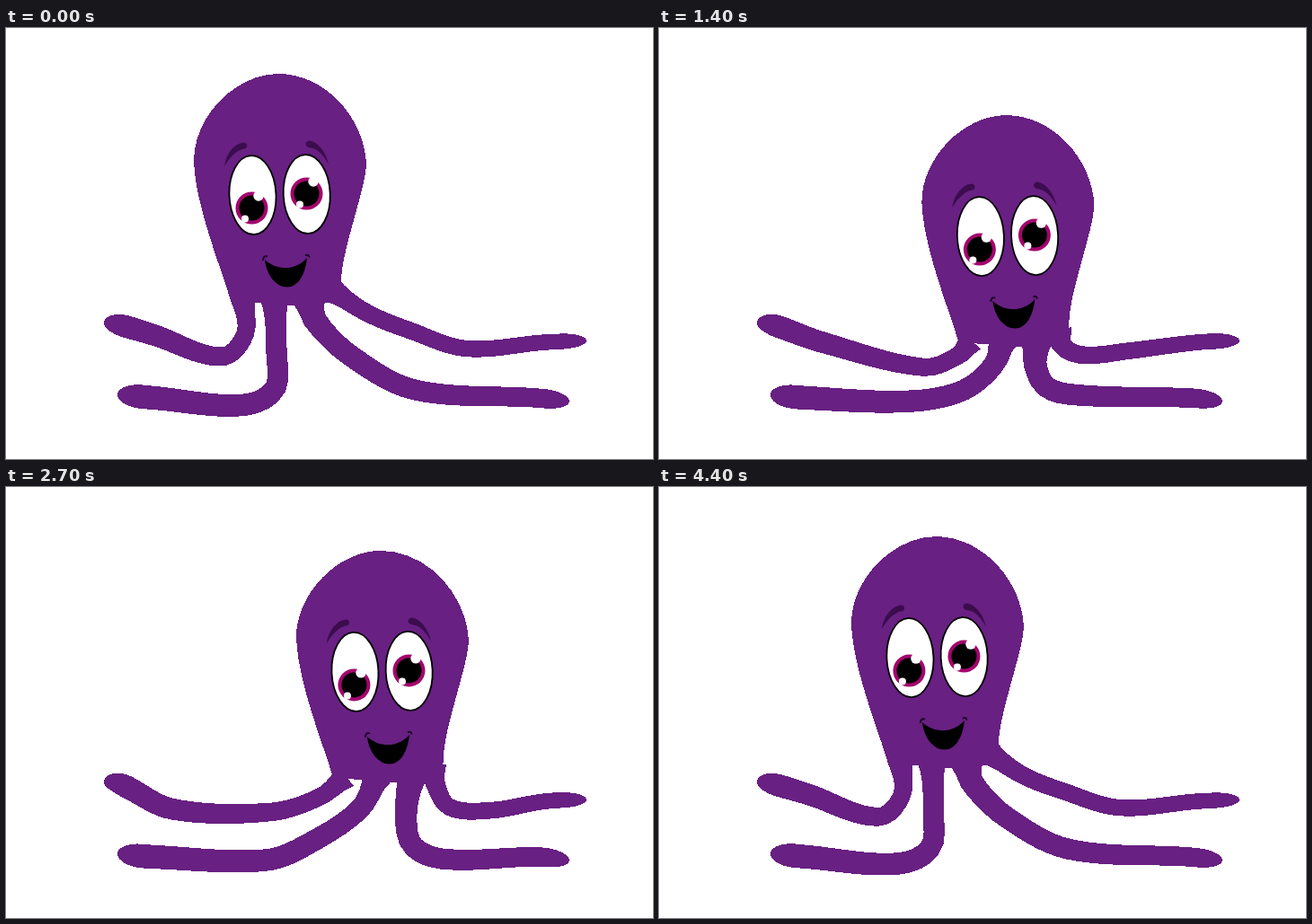
These frames come from a looping animation (720x480 px, 4500 ms). An HTML page:

```html
<!DOCTYPE html>
<html lang="en">
<head>
<meta charset="utf-8">
<title>Octopus</title>
<style>
  html, body { margin: 0; width: 100%; height: 100%; overflow: hidden; background: #fff; }
  svg { display: block; }
  .skin { fill: #682082; shape-rendering: crispEdges; }
</style>
</head>
<body>
<svg id="stage" width="720" height="480" viewBox="0 0 720 480">
  <defs>
    <g id="iris">
      <circle r="18" fill="#a3056c"/>
      <circle r="14"/>
      <circle cx="7.5" cy="-13.5" r="5.7" fill="#fff"/>
      <circle cx="-7.5" cy="12" r="4" fill="#fff"/>
    </g>
    <ellipse id="eye" rx="26" ry="44" transform="rotate(-2.5)" fill="#fff" stroke="#000" stroke-width="1.8"/>
  </defs>
  <g id="head">
    <path class="skin" d="M250 304C240 268 211 200 209 148C209 98 256 51 303 51C355 51 399 100 401 152
      C400 180 372 252 373 284Q372 302 353 307L316 309L279 306Z"/>
    <g fill="#3b0d4d">
      <path d="M243 154C245 139 255 128 265 127.5Q270 129 267 134C258 135 250 142 243 154Z"/>
      <path d="M359 152C356 137 346 126 337 125.5C332 127 333 132 337 133C347 134 353 141 359 152Z"/>
    </g>
    <use href="#eye" x="274.5" y="186"/>
    <use href="#eye" x="334.7" y="185"/>
    <use href="#iris" x="273.5" y="200.5"/>
    <use href="#iris" x="334.5" y="184.5"/>
    <path d="M288 258C302 271 323 270 335 256C333 275 325 288.500 313 288.500C300 288.500 290 275 288 258Z"/>
    <path d="M286 259q0-6 5-4.500M333 253.500q4-2 4.500 2" fill="none" stroke="#1c0526" stroke-width="2"/>
  </g>
</svg>
<script>
// Three poses: far left, lowest, far right. Flat lists of x, y.
const headPoses = [[0, 0], [69.5, 58], [146.5, -8]];

// An arm runs from a root on the head over three knees to a resting hand.
const arms = [
  { root: [264, 302], hand: [128, 331, 109, 327], width: [9, 13], knees: [
    [266, 341, 240, 366, 165, 342], [325, 374, 294, 385, 180, 346], [369, 323, 296, 345, 189, 368]] },
  { root: [299, 302], hand: [165, 412, 124, 408], width: [11, 13.5], knees: [
    [301, 360, 299, 402, 263, 420], [362, 384, 334, 409, 269, 416], [419, 338, 349, 383, 306, 415]] },
  { root: [337, 302], hand: [590, 412, 627, 416], width: [12.5, 10.5], knees: [
    [345, 327, 385, 366, 455, 403], [407, 380, 423, 401, 468, 407], [473, 354, 475, 399, 505, 420]] },
  { root: [361, 291], hand: [600, 350, 646, 348], width: [10, 8.5], knees: [
    [403, 318, 450, 337, 512, 357], [437, 366, 464, 368, 518, 359], [508, 305, 515, 348, 555, 361]] }
];

const svgNS = "http://www.w3.org/2000/svg";
const stage = document.getElementById("stage");
const head = document.getElementById("head");
const spine = document.createElementNS(svgNS, "path");
for (const arm of arms) {
  arm.path = document.createElementNS(svgNS, "path");
  arm.path.setAttribute("class", "skin");
  stage.insertBefore(arm.path, head);
}

const lerp = (a, b, k) => a + (b - a) * k;

function pose(poses, u) {
  const i = Math.min(1, Math.floor(u));
  return poses[i].map((v, j) => lerp(v, poses[i + 1][j], u - i));
}

// Pose number for each step of 100 ms.
const keys = [[0, 0], [12.2, 1], [22.2, 2], [33.55, 1], [44.8, 0], [45, 0]];
function progress(step) {
  const i = keys.findIndex(k => k[0] > step);
  const [t0, u0] = keys[i - 1], [t1, u1] = keys[i];
  return lerp(u0, u1, (step - t0) / (t1 - t0));
}

// A smooth open curve through the points.
function curve(flat) {
  const last = flat.length / 2 - 1;
  const at = i => {
    i = Math.max(0, Math.min(last, i));
    return [flat[2 * i], flat[2 * i + 1]];
  };
  const handle = (i, reach) => {
    const [ax, ay] = at(i - 1), [bx, by] = at(i + 1), [x, y] = at(i);
    const k = reach / Math.hypot(bx - ax, by - ay);
    return [x + (bx - ax) * k, y + (by - ay) * k];
  };
  let d = "M" + at(0);
  for (let i = 0; i < last; i++) {
    const [x, y] = at(i), end = at(i + 1);
    const reach = Math.hypot(end[0] - x, end[1] - y) / 3;
    d += "C" + [handle(i, reach), handle(i + 1, -reach), end];
  }
  return d;
}

// Half the width: flared at the root, rounded over the last 28 px.
function radius([thin, thick], s, length) {
  const cap = Math.max(0, 1 - (length - s) / 28);
  return (lerp(thin, thick, s / length) + 5.5 * Math.exp(-s / 12)) * Math.sqrt(1 - cap * cap);
}

function armOutline(points, width) {
  spine.setAttribute("d", curve(points));
  const length = spine.getTotalLength(), n = 44, near = [], far = [];
  for (let i = 0; i <= n; i++) {
    const s = length * Math.sin(Math.PI / 2 * i / n);
    const a = spine.getPointAtLength(Math.max(0, s - 1));
    const b = spine.getPointAtLength(Math.min(length, s + 1));
    const p = spine.getPointAtLength(s);
    const k = radius(width, s, length) / Math.hypot(b.x - a.x, b.y - a.y);
    const nx = (a.y - b.y) * k, ny = (b.x - a.x) * k;
    near.push([p.x + nx, p.y + ny]);
    far.unshift([p.x - nx, p.y - ny]);
  }
  return "M" + [...near, ...far].join("L") + "Z";
}

function draw(step) {
  const u = progress(step);
  const [dx, dy] = pose(headPoses, u);
  head.setAttribute("transform", `translate(${dx} ${dy})`);
  for (const { root, knees, hand, width, path } of arms) {
    const points = [root[0] + dx, root[1] + dy, ...pose(knees, u), ...hand];
    path.setAttribute("d", armOutline(points, width));
  }
}

const start = performance.now();
let shown = -1;
function tick() {
  const step = Math.floor((performance.now() - start) % 4500 / 100);
  if (step !== shown) draw(shown = step);
  requestAnimationFrame(tick);
}
tick();
</script>
</body>
</html>
```
